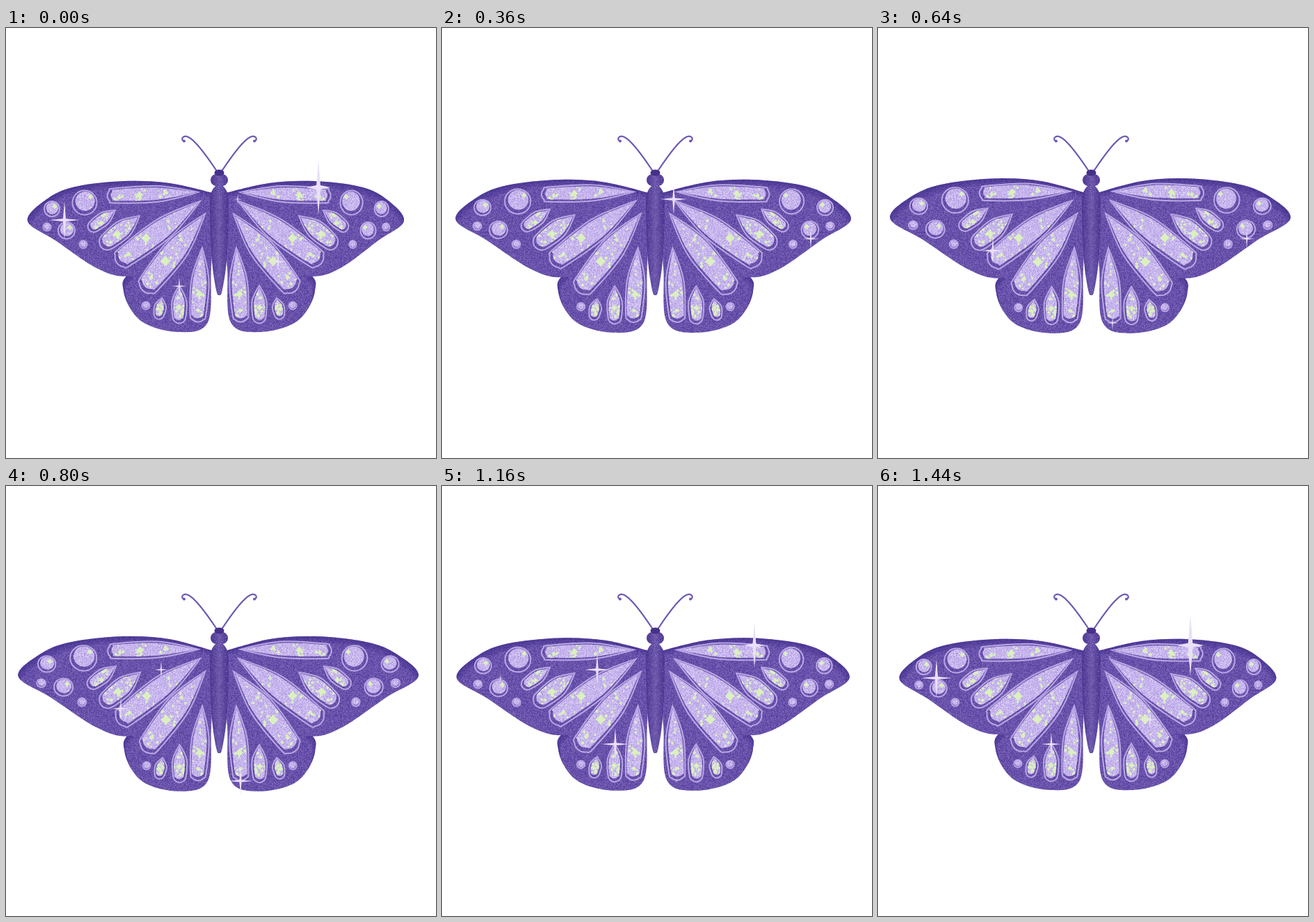
These frames come from a looping animation (618x618 px, 1.48 s). An HTML page with a canvas:

```html
<!DOCTYPE html>
<html lang="en">
<head>
<meta charset="utf-8">
<title>Butterfly</title>
<style>
html, body { margin: 0; width: 100%; height: 100%; overflow: hidden; background: #fff; }
canvas { display: block; width: 618px; height: 618px; }
</style>
</head>
<body>
<canvas id="stage" width="618" height="618"></canvas>
<script>
const ctx = document.getElementById('stage').getContext('2d');
const LOOP = 1480, STEP = 40, MID = 306.5, LIFE = 660;

let seed = 7;
const rnd = () => (seed = (seed * 16807) % 2147483647) / 2147483647;
const spread = d => (rnd() + rnd() - 1) * d;
const clamp = (v, lo, hi) => Math.max(lo, Math.min(hi, v));

// Key points of the left half, wings folded; the right half mirrors it.
const fore = [[300, 238], [235, 223], [170, 220], [100, 228], [60, 245], [31, 277], [72, 306], [130, 345], [172, 357], [212, 343], [300, 275]];
const hind = [[300, 262], [185, 345], [169, 378], [194, 421], [248, 437], [290, 423], [295, 345]];

// A drop runs from its tip to a round end at (bx, by).
function drop(tx, ty, bx, by, r) {
  const len = Math.hypot(bx - tx, by - ty), dx = (bx - tx) / len, dy = (by - ty) / len;
  const at = (along, off) => [tx + dx * along - dy * off, ty + dy * along + dx * off];
  const side = s => [at(len * 0.48, s * r * 1.08), at(len, s * r), at(len + r * 0.7, s * r * 0.7)];
  return { at, len, r, sharp: true, pts: [[tx, ty], ...side(1), at(len + r, 0), ...side(-1).reverse()] };
}

function ring(x, y, r) {
  const pts = Array.from({ length: 8 }, (_, i) => {
    const a = i * Math.PI / 4;
    return [x + r * Math.sin(a), y - r * Math.cos(a)];
  });
  return { pts, sharp: false };
}

const drops = [
  [276, 236, 156, 241, 10.5], [279, 249, 171, 329, 14.5], [286, 267, 207, 366, 15.5],
  [282, 316, 276, 411, 11.5], [249, 370, 249, 415, 9.5], [224, 388, 220, 411, 7.5],
  [192, 270, 146, 307, 12], [157, 262, 126, 285, 8.5]
].map(([tx, ty, bx, by, r]) => {
  const outer = drop(tx, ty, bx, by, r), gap = r * 0.25;
  return { ...outer, inner: drop(...outer.at(gap, 0), ...outer.at(outer.len - gap, gap * 0.3), r - 2.4) };
});
const rings = [[113, 251, 17.5], [66, 260, 11], [87, 291, 12], [59, 286, 5.5], [111, 311, 5.5], [201, 399, 5.5]]
  .map(([x, y, r]) => ({ ...ring(x, y, r), inner: ring(x + r * 0.04, y - r * 0.12, r * 0.8) }));
const cells = [...drops, ...rings];

// Glitter gathers in clumps along each drop.
const flecks = [];
for (const { at, len, r } of drops) {
  for (const [s, size] of [[0.7, 0.5], [0.95, 0.25], [0.4, 0.2]]) {
    const [x, y] = at(len * s, spread(r * 0.5));
    for (let k = 0; k < r; k++) {
      flecks.push([x + spread(r * 1.6 * (k > 0)), y + spread(r * 1.6 * (k > 0)), k ? 1 + rnd() * 2 : r * size]);
    }
  }
}
for (const { pts } of rings.slice(0, 3)) flecks.push([pts[1][0] - 4, pts[1][1] + 4, 4]);

// x, y, half height, time of full size
const sparkles = [
  [84, 276, 28, 1440], [249, 371, 26, 1260], [391, 336, 18, 1590],
  [449, 229, 50, 1340], [333, 246, 25, 260], [530, 303, 17, 490],
  [165, 320, 19, 670], [223, 264, 29, 1030], [337, 424, 22, 870]
];

function grain(base, tones, density) {
  const size = 160, tile = document.createElement('canvas');
  tile.width = tile.height = size;
  const g = tile.getContext('2d');
  g.fillStyle = base;
  g.fillRect(0, 0, size, size);
  for (let i = 0; i < size * size * density; i++) {
    g.fillStyle = tones[Math.floor(rnd() * tones.length)];
    g.fillRect(Math.floor(rnd() * size), Math.floor(rnd() * size), 1, 1);
  }
  return ctx.createPattern(tile, 'repeat');
}
const wingFill = grain('#6852ab', ['#573f9d', '#7b66b8'], 0.7);
const cellFill = grain('#c4b2ec', ['#dfd3f7', '#ae99df', '#cdbcf1'], 0.7);
const bodyGrain = grain('rgba(0, 0, 0, 0)', ['rgba(60, 40, 130, 0.3)', 'rgba(160, 140, 215, 0.25)'], 0.5);

function spline(pts, sharp, path = new Path2D()) {
  const n = pts.length, at = i => pts[(i + n) % n];
  const slope = (i, k) => sharp && i % n === 0 ? 0 : (at(i + 1)[k] - at(i - 1)[k]) / 6;
  path.moveTo(...pts[0]);
  for (let i = 0; i < n; i++) {
    const a = at(i), b = at(i + 1);
    path.bezierCurveTo(
      a[0] + slope(i, 0), a[1] + slope(i, 1),
      b[0] - slope(i + 1, 0), b[1] - slope(i + 1, 1), b[0], b[1]);
  }
  path.closePath();
  return path;
}

// The wing turns through its flat pose while the tip bends further.
function warper(side, p) {
  const flat = 4 * p * (1 - p), right = side > 0;
  return ([x, y]) => {
    const u = MID - x, bend = (Math.max(0, u - 130) / 146) ** 2;
    const out = right
      ? u - 0.08 * Math.max(0, u - 150) + 0.021 * u * flat + 21 * p * bend
      : u + 0.018 * u * flat + p * (15 * bend - 1.5 * Math.min(1, u / 130));
    const lift = clamp(0.06 * (y - 310), -4, 3) - 2 * bend;
    return [MID + side * out, y + p * lift * clamp(u / 100, 0, 1)];
  };
}

function paintWing(pts, warp) {
  const path = spline(pts.map(warp), true);
  ctx.fillStyle = wingFill;
  ctx.fill(path);
  ctx.save();
  ctx.clip(path);
  ctx.fillStyle = 'rgba(58, 36, 128, 0.2)';
  for (const d of [3, 6, 9]) {
    const band = new Path2D();
    band.rect(0, 0, 618, 618);
    spline(pts.map(([x, y]) => warp([x + d * 0.5, y + d])), true, band);
    ctx.fill(band, 'evenodd');
  }
  ctx.restore();
}

// Four-pointed star with straight thin arms.
function star(x, y, w, h, waist) {
  ctx.beginPath();
  for (let i = 0; i < 8; i++) {
    const a = i * Math.PI / 4, c = Math.cos(a), s = Math.sin(a);
    if (i % 2) ctx.lineTo(x + waist * Math.sign(c), y + waist * Math.sign(s));
    else ctx.lineTo(x + w * c, y + h * s);
  }
  ctx.fill();
}

function paintSide(side, p) {
  const warp = warper(side, p);
  paintWing(hind, warp);
  paintWing(fore, warp);

  const fills = new Path2D();
  ctx.strokeStyle = '#b9a7e5';
  ctx.lineWidth = 2;
  for (const { pts, sharp, inner } of cells) {
    ctx.stroke(spline(pts.map(warp), sharp));
    spline(inner.pts.map(warp), sharp, fills);
  }
  ctx.fillStyle = cellFill;
  ctx.fill(fills);

  ctx.save();
  ctx.clip(fills);
  ctx.fillStyle = '#dbf0bf';
  for (const [x, y, r] of flecks) star(...warp([x, y]), r, r, r * 0.45);
  ctx.restore();
}

const half = [[4, 378], [10, 340], [13, 285], [13, 245], [8, 230]];
const body = spline([
  [MID, 384], ...half.map(([d, y]) => [MID - d, y]),
  [MID, 226], ...half.map(([d, y]) => [MID + d, y]).reverse()
], false);
const shade = ctx.createLinearGradient(MID - 13, 0, MID + 13, 0);
[[0, '#4a358f'], [0.5, '#705bae'], [1, '#4a358f']].forEach(s => shade.addColorStop(...s));

function oval(x, y, rx, ry, fill) {
  ctx.fillStyle = fill;
  ctx.beginPath();
  ctx.ellipse(x, y, rx, ry, 0, 0, 7);
  ctx.fill();
}

function paintBody() {
  ctx.strokeStyle = '#6f59b0';
  ctx.lineWidth = 2.2;
  ctx.lineCap = 'round';
  for (const s of [-1, 1]) {
    const x = d => MID + s * d;
    ctx.beginPath();
    ctx.moveTo(x(4), 205);
    ctx.bezierCurveTo(x(14), 190, x(32), 163, x(44), 157);
    ctx.bezierCurveTo(x(50), 153.5, x(56), 158, x(52), 162);
    ctx.stroke();
    oval(x(50.5), 162.5, 2, 2, '#6f59b0');
  }
  for (const fill of [shade, bodyGrain]) {
    ctx.fillStyle = fill;
    ctx.fill(body);
    oval(MID, 218.5, 12.5, 10, fill);
  }
  oval(MID, 208, 7, 4.5, '#46308a');
}

function draw(t) {
  ctx.clearRect(0, 0, 618, 618);
  const p = (1 - Math.cos(2 * Math.PI * t / LOOP)) / 2;
  paintSide(-1, p);
  paintSide(1, p);
  paintBody();
  ctx.fillStyle = '#eae0f8';
  for (const [x, y, h, peak] of sparkles) {
    const age = (t - peak + LIFE / 2 + 2 * LOOP) % LOOP;
    if (age >= LIFE) continue;
    const s = Math.sin(Math.PI * age / LIFE);
    star(x, y, Math.min(22, h * 0.85) * s, h * s, h * 0.075 * s);
  }
}

const begin = performance.now();
function tick() {
  const t = (performance.now() - begin) % LOOP;
  draw(Math.floor(t / STEP) * STEP);
  requestAnimationFrame(tick);
}
tick();
</script>
</body>
</html>
```
